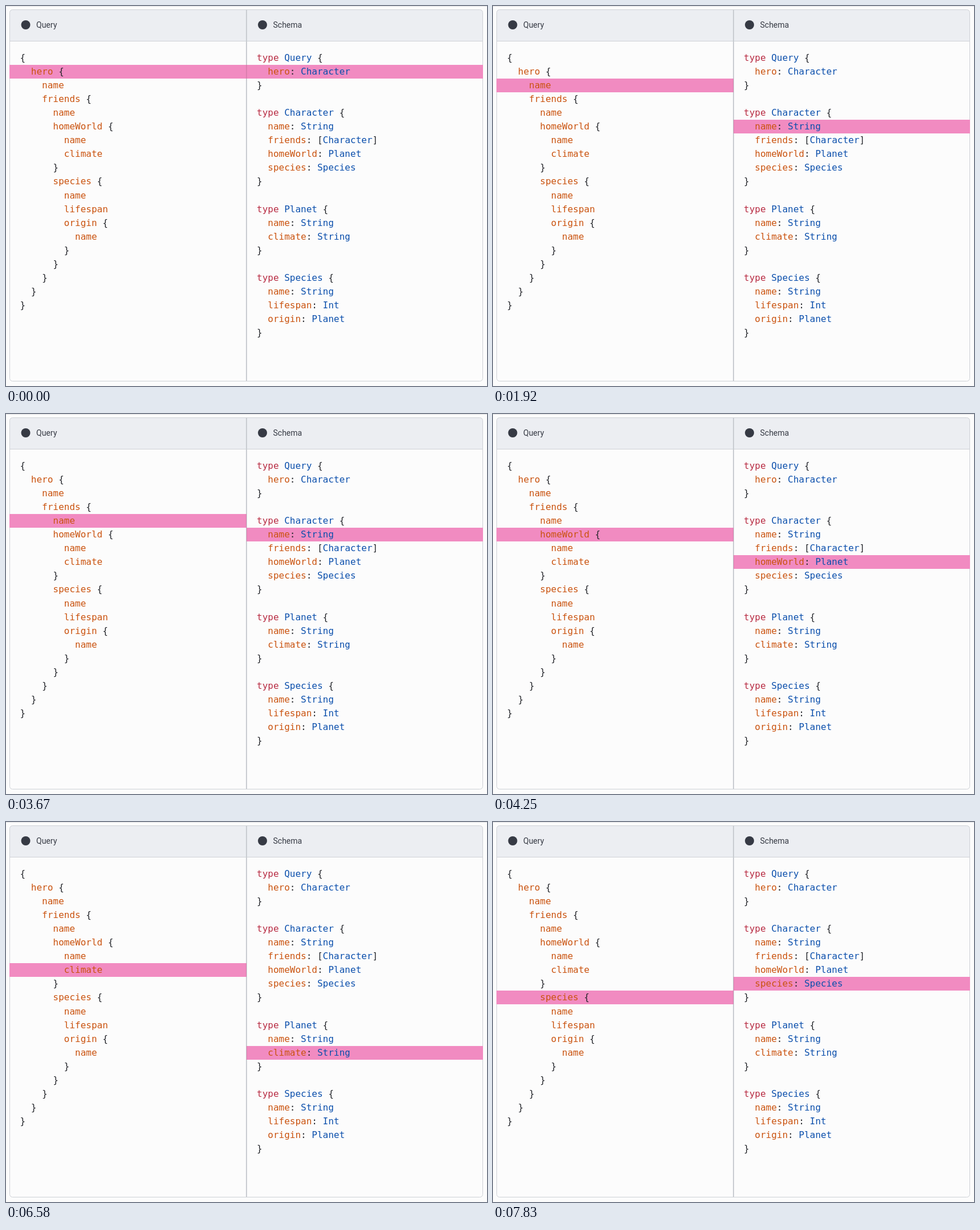
Animation of 842 by 665 pixels, one loop 8000 ms. Source, as an HTML page:

```html
<!DOCTYPE html>
<html lang="en">
<head>
<meta charset="utf-8">
<title>Query and schema</title>
<style>
  html, body { margin: 0; width: 842px; height: 665px; overflow: hidden; background: #fcfcfc; }
  svg { display: block; }
  .title { font: 14px Roboto, sans-serif; fill: #363a44; }
  .code { font: 16px "DejaVu Sans Mono", monospace; fill: #24262b; }
  .keyword { fill: #b82c43; }
  .type { fill: #0b4fac; }
  .field { fill: #ca530f; }
  .bar { fill: #f18bc1; }
</style>
</head>
<body>
<svg width="842" height="665" viewBox="0 0 842 665">
  <path d="M0 .5H842" stroke="#e3e3e5"/>
  <path d="M6.5 61V11.5q0-5 5-5H829.5q5 0 5 5V61Z" fill="#eceef2"/>
  <path d="M6.5 61.5H834.5" stroke="#ced1d6"/>
  <rect x="6.5" y="6.5" width="828" height="650" rx="5" fill="none" stroke="#ced1d6"/>
  <path d="M421 7V656" stroke="#c9ccd1" stroke-width="2"/>
  <g fill="#363a44"><circle cx="34.5" cy="33" r="8"/><circle cx="449" cy="33" r="8"/></g>
  <text class="title" x="53" y="38">Query</text>
  <text class="title" x="467.5" y="38">Schema</text>
  <rect class="bar" id="queryBar" x="6" width="415" height="24"/>
  <rect class="bar" id="schemaBar" x="421" width="414" height="24"/>
  <path id="seam" stroke="#dc7fb0"/>
  <g class="code" id="code"></g>
</svg>
<script>
const query = `{
  hero {
    name
    friends {
      name
      homeWorld {
        name
        climate
      }
      species {
        name
        lifespan
        origin {
          name
        }
      }
    }
  }
}`;

const schema = `type Query {
  hero: Character
}

type Character {
  name: String
  friends: [Character]
  homeWorld: Planet
  species: Species
}

type Planet {
  name: String
  climate: String
}

type Species {
  name: String
  lifespan: Int
  origin: Planet
}`;

// [start in ms, query row, schema row]
const steps = [
  [0, 1, 1], [830, 2, 5], [2000, 3, 6], [3170, 4, 5],
  [4250, 5, 7], [5420, 6, 12], [6580, 7, 13], [7750, 9, 8]
];

const LOOP = 8000, ADVANCE = 9.63;
const rowTop = row => 79 + 24.05 * row;
const byId = id => document.getElementById(id);

function colourWord(word) {
  const kind = word === 'type' ? 'keyword' : /^[A-Z]/.test(word) ? 'type' : 'field';
  return `<tspan class="${kind}">${word}</tspan>`;
}

function layOut(source, left) {
  return source.split('\n').map((line, row) => {
    const x = left + line.search(/\S|$/) * ADVANCE;
    const body = line.trim().replace(/\w+/g, colourWord);
    return `<text x="${x}" y="${rowTop(row) + 17}">${body}</text>`;
  }).join('');
}

byId('code').innerHTML = layOut(query, 24.5) + layOut(schema, 439);

function draw(now) {
  const time = now % LOOP;
  const [, queryRow, schemaRow] = steps.findLast(([start]) => start <= time);
  const queryTop = Math.round(rowTop(queryRow));
  const schemaTop = Math.round(rowTop(schemaRow));
  byId('queryBar').setAttribute('y', queryTop);
  byId('schemaBar').setAttribute('y', schemaTop);
  byId('seam').setAttribute('d', `M420.5 ${queryTop}v24M421.5 ${schemaTop}v24`);
}

const begin = performance.now();
function tick() {
  draw(performance.now() - begin);
  requestAnimationFrame(tick);
}
tick();
</script>
</body>
</html>
```
